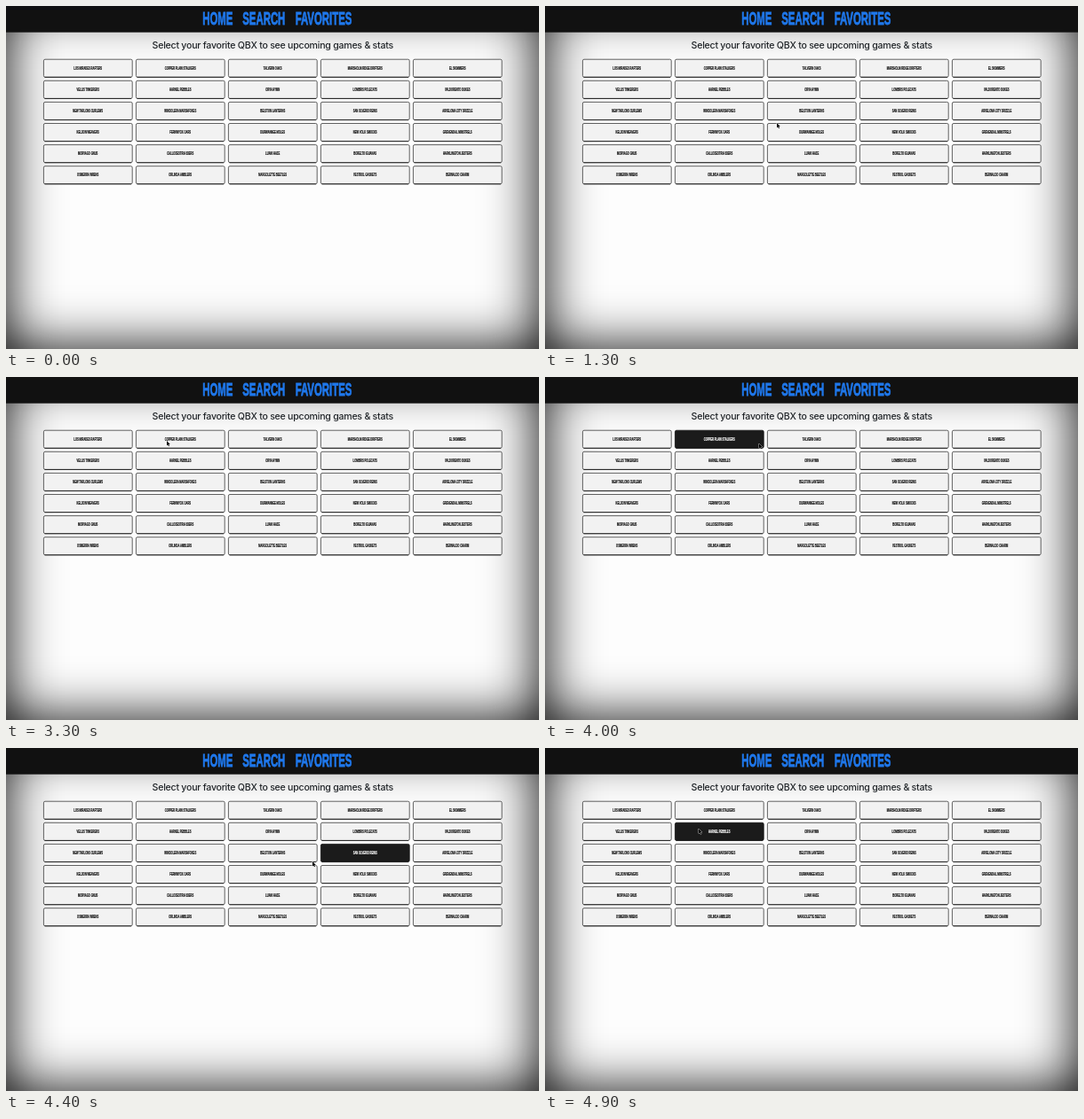
An HTML page for the animation above (5 s loop, 600 px wide and 387 px high).

```html
<!DOCTYPE html>
<html lang="en">
<head>
<meta charset="utf-8">
<title>Team picker</title>
<style>
  html, body { margin: 0; width: 100%; height: 100%; overflow: hidden; }
  body { background: #fdfdfd; box-shadow: inset 0 0 60px #000; }
  svg { position: absolute; left: 0; top: 0; width: 600px; height: 387px; }
  text { text-anchor: middle; }
  .slim { font-family: "Liberation Sans", Arial, sans-serif; font-weight: 700; }
  .nav { font-size: 20px; fill: #1f78ec; stroke: #1f78ec; stroke-width: .8; }
  .title { font: 500 10.6px Inter, sans-serif; letter-spacing: -.25px; fill: #212529; }
  .team rect { fill: #f2f2f2; stroke: #3a3a3a; stroke-width: .8; }
  .team path { stroke: #222; stroke-width: .9; }
  .team text { font-size: 4.7px; fill: #111; stroke: #111; stroke-width: .2; }
  .team.on rect { fill: #1b1b1b; stroke: #111; }
  .team.on text { fill: #fff; stroke: #fff; }
</style>
</head>
<body>
<svg viewBox="0 0 600 387">
  <rect width="600" height="29.7" fill="#111"/>
  <g id="nav"></g>
  <text class="title" x="300.3" y="48">Select your favorite QBX to see upcoming games &amp; stats</text>
  <g id="teams"></g>
  <path id="cursor" d="M0 0V5.4L1.2 4.3 2 6.2 3 5.8 2.2 3.9H3.8Z" fill="#000" stroke="#fff" stroke-width=".7" paint-order="stroke"/>
</svg>
<script>
const names = `LOS MIRADES RAFTERS,COPPER PLAIN STALKERS,TALVERN OAKS,MARSHOLM RIDGE DRIFTERS,EL SKIMMERS,
VELLIS TINKERERS,HARNEL PEBBLES,ORVA HYMN,LOMBRIS POLECATS,VALDORENTO DUKES,
NEW TARLONS CURLEWS,WINDOLERA MARSHFOXES,BELSTON LANTERNS,SAN OLVERIO REINS,ARVELOMA CITY DRIZZLE,
KELDON WEAVERS,FERNWYCK OARS,DURWANNEE MOLES,NEW VOLK SMOCKS,GREVENDAL MINSTRELS,
MORVAGO GNUS,CALLODESTRIA 83ERS,LUANI HAZE,BORELTO IGUANAS,HARKLINGTON JESTERS,
OSMERRA WRENS,ORLINDA AMBLERS,MARGOLETTE BEETLES,VESTROL GASKETS,BERNALDO CHARM`.split(/,\s*/);

const $ = id => document.getElementById(id);
const slim = (label, x, y, cls = "") =>
  `<text class="slim ${cls}" transform="translate(${x} ${y}) scale(.57 1)">${label}</text>`;

$("nav").innerHTML = slim("HOME", 238.3, 20.8, "nav") +
  slim("SEARCH", 290.3, 20.8, "nav") + slim("FAVORITES", 357.5, 20.8, "nav");

$("teams").innerHTML = names.map((name, i) => {
  const x = 42 + i % 5 * 104, y = 60 + Math.floor(i / 5) * 24.1;
  return `<g class="team"><rect x="${x + .4}" y="${y + .2}" width="99.8" height="20" rx="1.6"/>` +
    `<path d="M${x + 1.5} ${y + 20.4}h97.6"/>${slim(name, x + 50.2, y + 11.7)}</g>`;
}).join("");
const teams = [...$("teams").children];

// Pointer stops: [tenths of a second, x, y]
const stops = [
  [1, 300, 382], [2, 296, 340], [4, 290, 284], [6, 268, 261], [8, 205, 215], [9, 187, 180],
  [10, 200, 150], [12, 248, 133], [13, 261, 132], [15, 222, 143], [16, 199, 135], [18, 243, 142],
  [20, 257, 198], [21, 258, 207], [22, 259, 190], [24, 250, 122], [26, 188, 108], [27, 161, 98],
  [30, 181, 71], [33, 181, 72], [37, 193, 72], [40, 241, 75], [42, 335, 95], [43, 362, 112],
  [44, 345, 128], [46, 270, 166], [47, 205, 150], [48, 178, 122], [49, 173, 91]
];
// Highlighted team from step 38 on
const hovers = [1, 1, 1, 2, 7, 13, 13, 17, 22, 16, 11, 6];

function pointer(step) {
  const i = Math.max(1, stops.findIndex(s => s[0] >= step));
  const [t0, x0, y0] = stops[i - 1], [t1, x1, y1] = stops[i];
  const k = (step - t0) / (t1 - t0);
  return [x0 + (x1 - x0) * k, y0 + (y1 - y0) * k];
}

function draw(now) {
  const step = Math.floor(now % 5000 / 100);
  const cursor = $("cursor");
  cursor.style.display = step ? "" : "none";
  cursor.setAttribute("transform", `translate(${pointer(step)})`);
  teams.forEach((team, i) => team.classList.toggle("on", hovers[step - 38] === i));
}

const start = performance.now();
function loop() {
  draw(performance.now() - start);
  requestAnimationFrame(loop);
}
loop();
</script>
</body>
</html>
```
